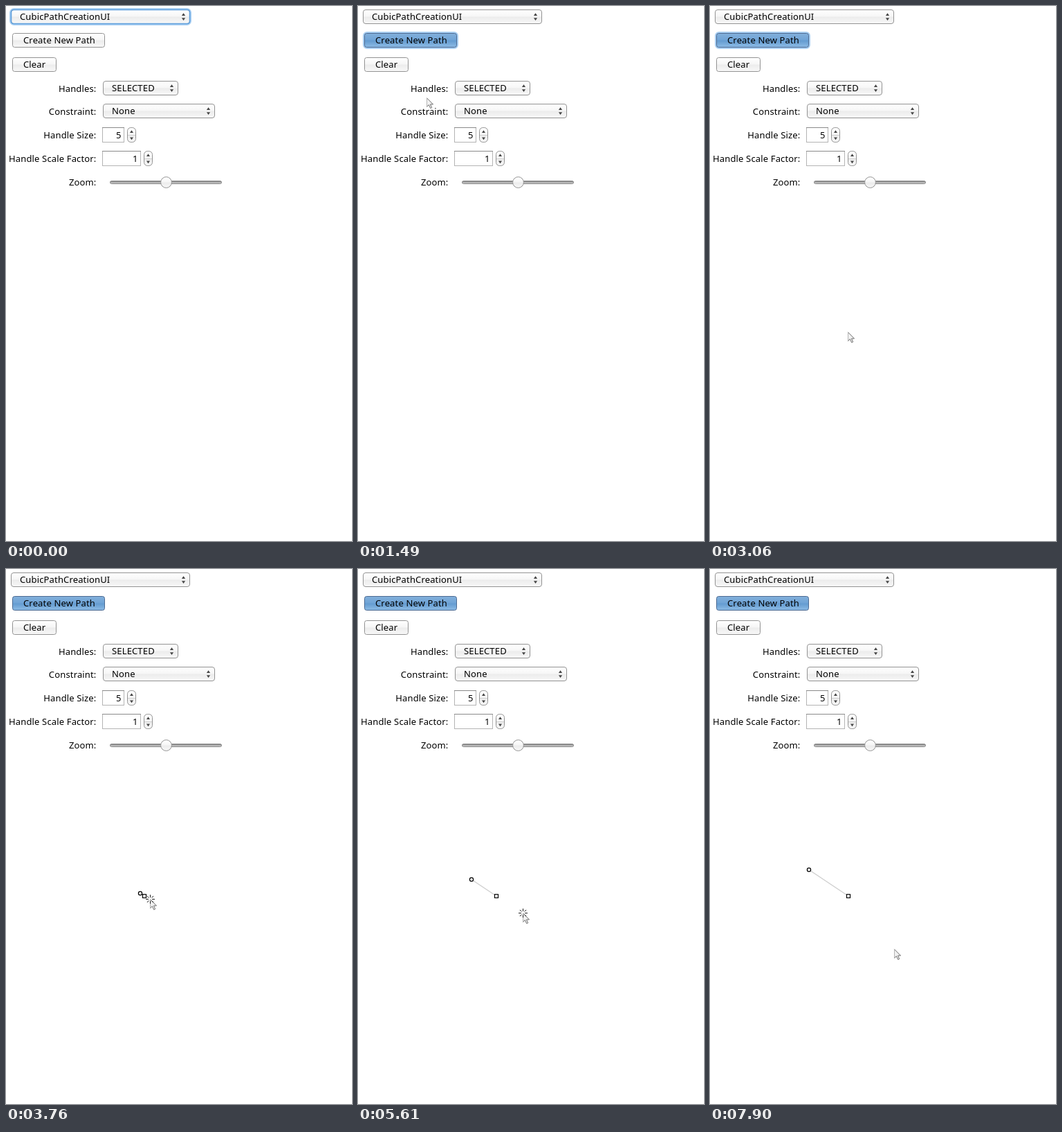
Animation, 500 px wide and 772 px high, one loop 8000 ms. Source, as an HTML page:

```html
<!DOCTYPE html>
<html lang="en">
<head>
<meta charset="utf-8">
<title>Path editor</title>
<style>
  html, body { margin: 0; width: 100%; height: 100%; overflow: hidden; background: #fff; }
  svg { display: block; }
  text { font: 13px "Noto Sans", "Open Sans", sans-serif; letter-spacing: .15px; fill: #000; }
  .end { text-anchor: end; }
  .ctl { fill: url(#grey); stroke: #939393; }
  .field { fill: #fff; stroke: #b4b4b4; }
  .on { fill: url(#blue); stroke: #4c6a92; }
  .ring rect { fill: none; stroke: #5f9fdc; }
  .ring .glow { stroke: #a9cff2; stroke-width: 3; }
  .tri { fill: #444; }
  .handle { fill: #fff; stroke: #000; stroke-width: 1.2; }
</style>
</head>
<body>
<svg width="500" height="772" viewBox="0 0 500 772">
  <defs>
    <linearGradient id="grey" x2="0" y2="1">
      <stop offset="0" stop-color="#fff"/>
      <stop offset=".48" stop-color="#f6f6f6"/>
      <stop offset=".52" stop-color="#ececec"/>
      <stop offset="1" stop-color="#f8f8f8"/>
    </linearGradient>
    <linearGradient id="blue" x2="0" y2="1">
      <stop offset="0" stop-color="#83b0db"/>
      <stop offset=".48" stop-color="#70a4d6"/>
      <stop offset=".52" stop-color="#639bd0"/>
      <stop offset="1" stop-color="#8dbbe5"/>
    </linearGradient>
    <linearGradient id="track" x2="0" y2="1">
      <stop offset="0" stop-color="#777"/>
      <stop offset="1" stop-color="#e2e2e2"/>
    </linearGradient>
    <path id="arrows" class="tri" d="M-2.6-1.5L0-5.3 2.6-1.5zM-2.6 1.7L0 5.5 2.6 1.7z"/>
    <g id="spin">
      <rect class="ctl" x=".5" y=".5" width="12" height="21" rx="5"/>
      <path d="M1 11.5H12" stroke="#d0d0d0"/>
      <path class="tri" d="M4 8L6.5 4.2 9 8zM4 14.5L6.5 18.3 9 14.5z"/>
    </g>
  </defs>

  <g id="comboRing" class="ring">
    <rect class="glow" x="6.5" y="4.5" width="260" height="22" rx="5"/>
  </g>
  <rect class="ctl" x="7.5" y="5.5" width="258" height="20" rx="3.5"/>
  <g id="comboEdge" class="ring"><rect x="7.5" y="5.5" width="258" height="20" rx="3.5" stroke-width="1.6"/></g>
  <use href="#arrows" x="256.5" y="15.5"/>
  <text x="20" y="20">CubicPathCreationUI</text>

  <g id="buttonRing" class="ring">
    <rect class="glow" x="8.5" y="38.5" width="135" height="22" rx="4.5"/>
  </g>
  <rect id="button" class="ctl" x="9.5" y="39.5" width="133" height="20" rx="3"/>
  <text x="25" y="54">Create New Path</text>

  <rect class="ctl" x="9.5" y="74.5" width="63" height="20" rx="3"/>
  <text x="25" y="89">Clear</text>

  <g class="end">
    <text x="130.5" y="124">Handles:</text>
    <text x="130.5" y="157">Constraint:</text>
    <text x="130.5" y="191">Handle Size:</text>
    <text x="130.5" y="225">Handle Scale Factor:</text>
    <text x="130.5" y="259">Zoom:</text>
  </g>

  <rect class="ctl" x="140.5" y="108.5" width="108" height="20" rx="3.5"/>
  <use href="#arrows" x="239.5" y="118.5"/>
  <text x="153" y="123">SELECTED</text>

  <rect class="ctl" x="140.5" y="141.5" width="161" height="20" rx="3.5"/>
  <use href="#arrows" x="292.5" y="151.5"/>
  <text x="153" y="156">None</text>

  <rect class="field" x="139.5" y="175.5" width="31" height="21"/>
  <path d="M139 175.5H171" stroke="#8a8a8a"/>
  <text class="end" x="166.5" y="191">5</text>
  <use href="#spin" x="175" y="175"/>

  <rect class="field" x="139.5" y="209.5" width="55" height="21"/>
  <path d="M139 209.5H195" stroke="#8a8a8a"/>
  <text class="end" x="190.5" y="225">1</text>
  <use href="#spin" x="199" y="209"/>

  <rect x="150.5" y="252.5" width="161" height="4" rx="2" fill="url(#track)" stroke="#868686"/>
  <circle class="ctl" cx="231.5" cy="254.5" r="7.9"/>

  <g id="node">
    <path id="arm" stroke="#ccc" stroke-width="1.2"/>
    <rect class="handle" x="197.5" y="469.5" width="5" height="5"/>
    <circle id="knob" class="handle" r="2.6"/>
  </g>

  <g id="cursor">
    <path d="M.5.8V13.3L3.3 10.6 5.7 15.6 7.7 14.7 5.5 9.9H9.5z" fill="#f1f1f1" stroke="#666" stroke-width=".95"/>
    <path d="M.5 1V13" stroke="#b5b5b5"/>
    <path id="rays" d="M.5-2V-6M.5 3V7M-2 .5H-6M3 .5H7M-1.5-1.5l-2.6-2.6M2.5-1.5l2.6-2.6M-1.5 2.5l-2.6 2.6M2.5 2.5l2.6 2.6" stroke="#222"/>
  </g>
</svg>
<script>
  const $ = id => document.getElementById(id);
  const show = (id, on) => $(id).setAttribute('visibility', on ? 'visible' : 'hidden');
  const LOOP = 8000, LAG = 50;

  // Times at which the pointer takes one step of each stroke.
  const travel = [1190, 1290, 1390, 1490, 1600, 1690, 1780, 1870, 1950, 2060,
    2150, 2250, 2340, 2440, 2540, 2650, 2750, 2860, 2970, 3060];
  const drag = [3400, 3580, 3760, 3940, 4130, 4330, 4480, 4680, 4880, 5060,
    5250, 5420, 5610, 5790, 5960, 6140, 6310, 6510, 6710];
  const leave = [7480, 7590, 7690, 7800, 7900];

  const steps = (times, t) => times.filter(s => t >= s).length;

  function draw(t) {
    const go = steps(travel, t), pull = steps(drag, t), out = steps(leave, t);
    const x = Math.floor(75 + 6.2 * go + 1e-6) + 3 * pull + 2 * out;
    const y = Math.floor(48 + 21.1 * go + 1e-6) + 2 * pull + 8 * out;
    $('cursor').setAttribute('transform', `translate(${x} ${y})`);
    show('cursor', t >= 530);
    show('rays', (t >= 530 && t < 700) || (t >= 3210 && t < 6880));

    const pressed = t >= 580;
    show('comboRing', !pressed);
    show('comboEdge', !pressed);
    show('buttonRing', pressed && t < 3260);
    $('button').setAttribute('class', pressed ? 'on' : 'ctl');

    // The control handle mirrors the pointer and trails it slightly.
    const n = steps(drag, t - LAG), hx = 200 - 3 * n, hy = 472 - 2 * n;
    show('node', t >= 3310);
    $('knob').setAttribute('cx', hx);
    $('knob').setAttribute('cy', hy);
    $('arm').setAttribute('d', `M200 472L${hx} ${hy}`);
  }

  const start = performance.now();
  function tick() {
    draw((performance.now() - start) % LOOP);
    requestAnimationFrame(tick);
  }
  tick();
</script>
</body>
</html>
```
